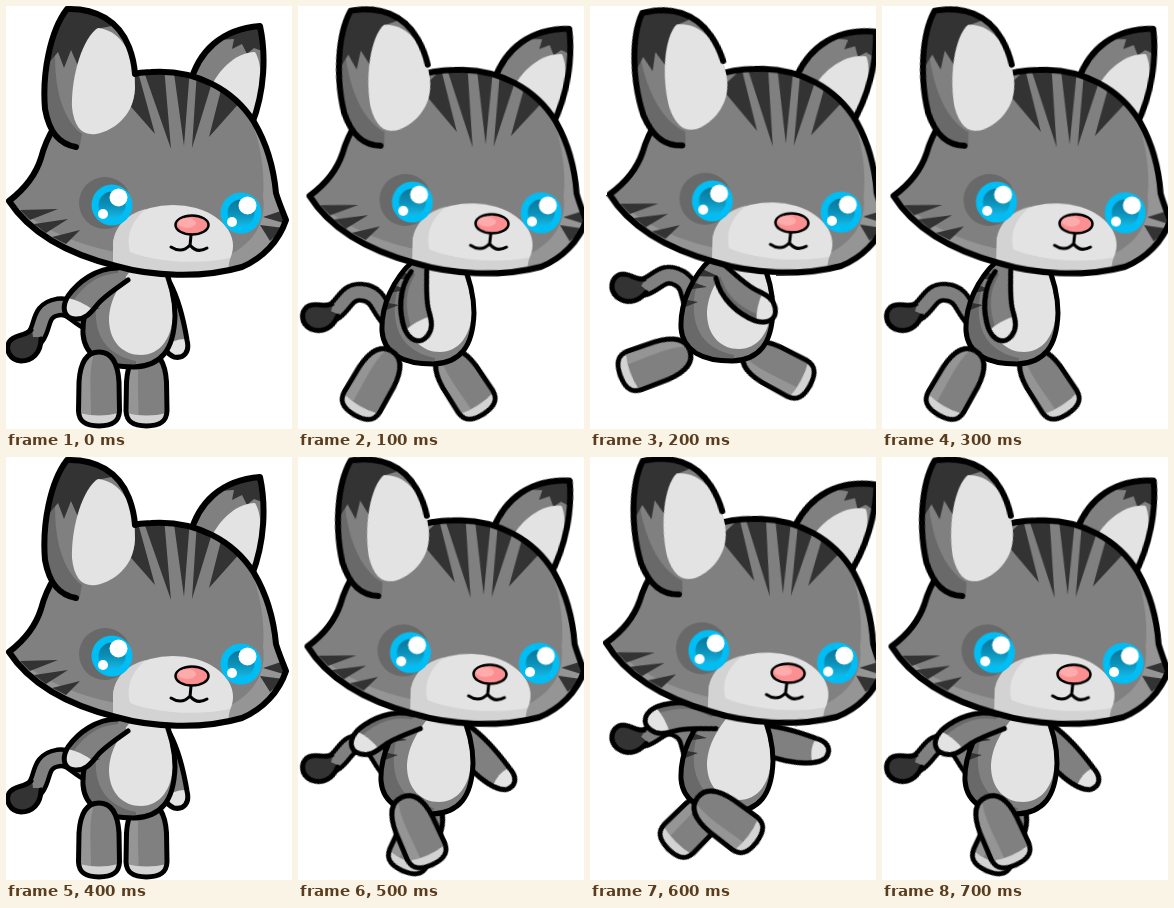
Recreate the animation shown at these times as an HTML page. Size 286x423 px, loop 800 ms.

```html
<!DOCTYPE html>
<html lang="en">
<head>
<meta charset="utf-8">
<title>Walking kitten</title>
<style>
html, body { margin: 0; width: 100%; height: 100%; overflow: hidden; background: #fff; }
svg { display: block; width: 286px; height: 423px; }

.fur { fill: #808080; }
.shade { fill: #696969; }
.light { fill: #959595; }
.dark { fill: #333; }
.pale { fill: #e3e3e3; }
.dim { fill: #d3d3d3; }
.line { fill: none; stroke: #000; stroke-width: 5; stroke-linecap: round; stroke-linejoin: round; }

/* Eight held poses per stride; the passing poses repeat */
.part { animation: 800ms step-end infinite; }
#head { transform-origin: 150px 195px; animation-name: head; }
#earL { transform-origin: 85px 125px; animation-name: earL; }
#earR { transform-origin: 222px 95px; animation-name: earR; }
#body { animation-name: body; }
#tail { transform-origin: 82px 315px; animation-name: tail; }
#armL { transform-origin: 115px 272px; animation-name: armL; }
#armR { transform-origin: 150px 285px; animation-name: armR; }
#legL { transform-origin: 93px 383px; animation-name: legL; }
#legR { transform-origin: 140.5px 383px; animation-name: legR; }

@keyframes head {
  0%, 50%, 100% { transform: none; }
  12.5%, 37.5% { transform: translate(8.5px, -2px) rotate(1.2deg); }
  25% { transform: translate(16.5px, -3px) rotate(1.4deg); }
  62.5%, 87.5% { transform: translate(6.5px, -2.5px) rotate(1.2deg); }
  75% { transform: translate(13px, -4px) rotate(2deg); }
}
@keyframes earL {
  0%, 50%, 100% { transform: none; }
  12.5%, 37.5% { transform: rotate(-10deg); }
  25% { transform: rotate(-14.5deg); }
  62.5%, 87.5% { transform: rotate(-9deg); }
  75% { transform: rotate(-13.5deg); }
}
@keyframes earR {
  0%, 50%, 100% { transform: none; }
  12.5%, 37.5% { transform: rotate(4deg); }
  25% { transform: rotate(9deg); }
  62.5%, 87.5% { transform: rotate(6deg); }
  75% { transform: rotate(11deg); }
}
@keyframes body {
  0%, 50%, 100% { transform: none; }
  12.5%, 37.5% { transform: translate(7px, -3px); }
  25% { transform: translate(14px, -6px); }
  62.5%, 87.5% { transform: translate(6px, -4px); }
  75% { transform: translate(14px, -6px); }
}
@keyframes tail {
  0%, 50%, 100% { transform: none; }
  12.5%, 37.5% { transform: translate(8px, -4px) rotate(22deg); }
  25%, 75% { transform: translate(22px, -13px) rotate(39deg); }
  62.5%, 87.5% { transform: translate(8px, -4px) rotate(22deg); }
}
@keyframes armL {
  0%, 50%, 100% { transform: none; }
  12.5%, 37.5% { transform: translate(8px, -3px) rotate(-54deg); }
  25% { transform: translate(20px, -5px) rotate(-103deg); }
  62.5%, 87.5% { transform: translate(1px, -4px) rotate(14deg); }
  75% { transform: translate(6px, -6px) rotate(36deg); }
}
@keyframes armR {
  0%, 50%, 100% { transform: none; }
  12.5%, 37.5% { transform: translate(-2px, -12px) rotate(22deg); }
  25% { transform: translate(-4px, -14px) rotate(32deg); }
  62.5%, 87.5% { transform: translate(12px, -3px) rotate(-27deg); }
  75% { transform: translate(19px, -1px) rotate(-60deg); }
}
@keyframes legL {
  0%, 50%, 100% { transform: none; }
  12.5%, 37.5% { transform: translate(-18px, -6px) rotate(30deg); }
  25% { transform: translate(-28px, -26px) rotate(70deg); }
  62.5%, 87.5% { transform: translate(26px, -9px) rotate(-24deg); }
  75% { transform: translate(44px, -20px) rotate(-53deg); }
}
@keyframes legR {
  0%, 50%, 100% { transform: none; }
  12.5%, 37.5% { transform: translate(25px, -6px) rotate(-33deg); }
  25% { transform: translate(47px, -21px) rotate(-62deg); }
  62.5%, 87.5% { transform: translate(-21px, -3px) rotate(24deg); }
  75% { transform: translate(-36px, -17px) rotate(45deg); }
}
</style>
</head>
<body>
<svg viewBox="0 0 286 423">
  <defs>
    <path id="skull" d="M3 195C20 182 30 168 35 152C46 110 85 68 145 66C190 63 228 84 248 116C261 138 268 165 270 187C273 197 277 206 280 214C273 235 257 252 236 261C195 273 145 270 110 260C62 248 24 227 3 195Z"/>
    <path id="torso" d="M108 258C88 276 76 303 77 328C79 352 100 361 128 361C155 360 168 344 169 310C169 290 164 274 157 258Z"/>
    <path id="thigh" d="M93 346C79 346 74 360 73 376L72.5 405C73 416 80 420 93 420C106 420 113 416 113.5 405L113 376C112 360 107 346 93 346Z"/>
    <path id="flapL" d="M70 142C52 138 43 125 39 103C36 68 44 25 61 3C90 2 113 15 123 41Q129 56 129 82C128 110 105 138 70 142Z"/>
    <path id="flapR" d="M184 78C192 46 215 23 254 20C260 48 259 84 246 118Z"/>
    <clipPath id="inSkull"><use href="#skull"/></clipPath>
    <clipPath id="inTorso"><use href="#torso"/></clipPath>
    <clipPath id="inThigh"><use href="#thigh"/></clipPath>
    <clipPath id="inEarL"><use href="#flapL"/></clipPath>
    <clipPath id="inEarR"><use href="#flapR"/></clipPath>
    <linearGradient id="iris" x2="0" y2="1">
      <stop offset="0" stop-color="#0a7599"/>
      <stop offset=".5" stop-color="#0a90b8"/>
      <stop offset="1" stop-color="#14b8e6"/>
    </linearGradient>
    <g id="eye">
      <circle r="20.5" fill="#00bdf4"/>
      <circle r="13.5" fill="url(#iris)"/>
      <circle cx="6.5" cy="-7.5" r="9" fill="#fff"/>
      <circle cx="-9" cy="9" r="5" fill="#fff"/>
    </g>
    <g id="leg">
      <use href="#thigh" class="fur"/>
      <g clip-path="url(#inThigh)">
        <path class="light" d="M70 340H92C80 358 86 390 85 425H70Z"/>
        <path class="dim" d="M66 405Q93 414 120 405V430H66Z"/>
      </g>
      <use href="#thigh" class="line"/>
    </g>
    <path id="stem" d="M20 338C42 328 28 305 52 301C66 299 70 310 84 316"/>
  </defs>

  <g id="tail" class="part">
    <use href="#stem" class="line" style="stroke-width:21"/>
    <use href="#stem" class="line" style="stroke:#808080;stroke-width:12"/>
    <path class="dark" d="M35 331C36 346 27 355 15 355C4 354 -1 344 3 336C8 328 18 330 26 323L27 331Z"/>
    <path class="line" d="M35 333C35 347 26 355 15 355C4 354 -1 344 3 336C8 328 18 331 25 324"/>
  </g>

  <g id="armR" class="part">
    <path class="fur" d="M164 277C174 296 178 316 181 334C184 346 178 353 168 351C156 346 142 318 140 284Z"/>
    <path class="pale" d="M159 341Q169 332 181 333C184 346 178 353 168 351Q163 348 159 341Z"/>
    <path class="line" d="M164 277C174 296 178 316 181 334C184 346 178 353 168 351C156 346 142 318 140 284"/>
  </g>

  <g id="legR" class="part"><use href="#leg" x="47.5"/></g>

  <g id="body" class="part">
    <use href="#torso" class="fur"/>
    <g clip-path="url(#inTorso)">
      <path class="shade" d="M70 255H104C82 300 82 345 130 355V370H70Z"/>
      <path class="dark" d="M96 268L116 277L91 276ZM86 281L103 287L82 290ZM78 299L94 302L76 309ZM172 284L162 290L172 296Z"/>
      <path class="pale" d="M130 258C116 275 103 292 103 315C104 336 117 349 135 349C154 349 166 332 167 309C167 288 158 270 154 258Z"/>
    </g>
    <use href="#torso" class="line"/>
  </g>

  <g id="legL" class="part"><use href="#leg"/></g>

  <g id="armL" class="part">
    <path class="fur" d="M112 262C90 262 72 276 62 290C55 302 58 312 69 313C80 314 86 305 91 299C97 291 108 284 122 274Z"/>
    <path class="shade" d="M112 262C90 262 72 276 62 290L67 295C78 280 90 269 112 267Z"/>
    <path class="pale" d="M61 292Q74 294 87 304C82 311 78 314 69 313C58 312 56 303 61 292Z"/>
    <path class="line" d="M112 262C90 262 72 276 62 290C55 302 58 312 69 313C80 314 86 305 91 299C97 291 108 284 122 274"/>
  </g>

  <g id="head" class="part">
    <g id="earR" class="part">
      <use href="#flapR" class="fur"/>
      <g clip-path="url(#inEarR)">
        <path class="dark" d="M212 10H270V50L248 42L241 48L236 38L226 43L228 33L212 34Z"/>
        <path class="pale" d="M202 90C208 66 230 46 249 46C258 60 256 95 247 120Z"/>
      </g>
      <use href="#flapR" class="line" style="stroke-width:6"/>
    </g>

    <use href="#skull" class="fur"/>
    <g clip-path="url(#inSkull)">
      <path class="light" d="M226 78C250 112 260 155 257 190C262 222 240 246 205 256L200 280H300V78Z"/>
      <path class="light" d="M0 190C30 222 70 240 120 248L130 275H0Z"/>
      <path class="dark" d="M112 86L132 66L149 128ZM136 60H158L165 143ZM167 60L184 62L178 140ZM191 64L208 70L186 142ZM217 76L236 94L203 131Z"/>
      <path class="dark" d="M14 204L52 203L24 214ZM28 218L62 213L40 227ZM46 231L74 224L60 238ZM284 202L257 211L284 219ZM278 222L254 219L264 235Z"/>
      <ellipse class="pale" cx="167" cy="240" rx="60" ry="41"/>
      <path class="dim" d="M107 240C107 222 120 208 140 203C124 216 120 232 124 246C150 256 190 259 224 252L220 275H107Z"/>
    </g>
    <use href="#skull" class="line" style="stroke-width:6"/>

    <circle class="shade" cx="99" cy="197" r="26"/>
    <use href="#eye" x="106" y="199"/>
    <use href="#eye" x="235" y="207"/>
    <path class="line" style="stroke-width:3" d="M185 229L184 240M165 241Q176 248 184 239Q191 248 201 242"/>
    <ellipse cx="186" cy="219" rx="16.5" ry="9.5" fill="#fb8f91" stroke="#000" stroke-width="2.5"/>
    <ellipse cx="181" cy="217" rx="9" ry="5" fill="#fdabab"/>

    <g id="earL" class="part">
      <use href="#flapL" class="fur"/>
      <g clip-path="url(#inEarL)">
        <path class="shade" d="M30 0H56C44 45 46 105 76 128L72 150H30Z"/>
        <path class="dark" d="M30 0H106V20L90 23L80 38L72 60L65 44L58 62L52 46L40 60Z"/>
        <path class="pale" d="M92 22C76 32 65 72 66 101C68 121 76 130 90 128C113 123 130 104 130 78C129 48 114 24 92 22Z"/>
      </g>
      <path class="line" style="stroke-width:6" d="M70 141C52 138 43 125 39 103C36 68 44 25 61 3C90 2 113 15 123 41Q128 54 129 68"/>
    </g>
  </g>
</svg>
</body>
</html>
```
